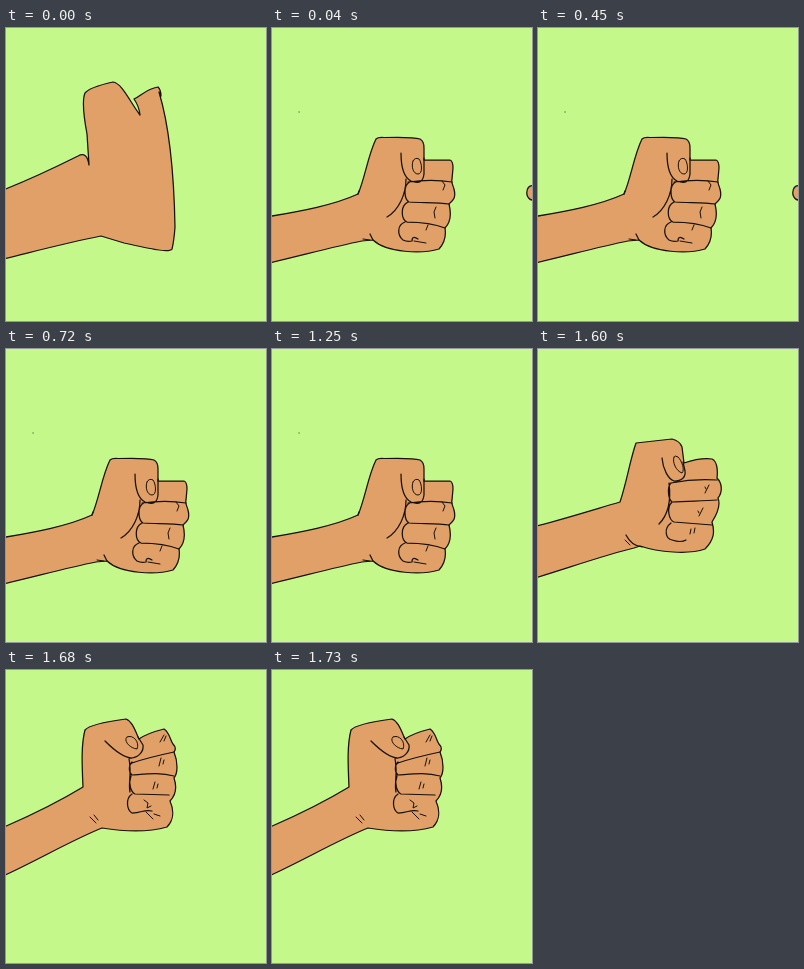
An HTML page that plays this animation: 260 by 293 pixels, repeating every 1.76 s.

```html
<!DOCTYPE html>
<html lang="en">
<head>
<meta charset="utf-8">
<title>Fist shake</title>
<style>
  html, body { margin: 0; width: 100%; height: 100%; overflow: hidden; background: #c5f88b; }
  svg { display: block; width: 100%; height: 100%; }
  path { fill: none; stroke: #17100a; stroke-width: 1.25; stroke-linecap: round; stroke-linejoin: round; }
  .skin { fill: #e0a067; }
  .fine { stroke-width: 1; }
  g { visibility: hidden; }
</style>
</head>
<body>
<svg viewBox="0 0 260 293">
  <g id="swing">
    <path class="skin" d="M-3 162C25 151 50 139 72 128Q81 123 83 137L81 106C78 90 76 72 79 65C83 60 98 56 107 54C116 55 124 74 134 87Q133 78 128 71C135 68 140 61 152 59Q155 62 155 68L153 64C163 97 168 145 169 199Q168 213 166 221C163 225 145 221 118 215L95 208C60 215 30 223 -3 231"/>
  </g>

  <g id="rest">
    <path class="skin" d="M-3 188.500C30 183 62 177 86 166C93 150 96 127 104 111Q106 109 112 109.500C130 109 142 109 148 111Q152 113 152 120V132L178 132Q181 133 181 140L180 151C179 155 181 157 182 161C184 169 182 172 177 176C179 184 179 194 173 200Q175 212 167 221C150 226 115 225 101 212L90 213C60 219 28 228 -3 235"/>
    <path d="M129 125C129 140 133 150 139 153C147 156 151 154 152 146V130M136 154C150 152 168 152 180 154M138 154C131 157 132 171 137 174C150 175 166 174 177 176M136 174C128 178 129 191 135 194C150 194 163 196 173 200M133 194C125 197 125 207 131 212Q135 214 140 213Q140 207 146 211M134 151C134 166 127 182 115 189M86 166l1 -3M101 212l-3 -6"/>
    <path class="fine" d="M141 133C139 138 141 146 146 146C151 146 150 135 147 131Q143 129 141 133M170 153l3 4 -2 5M164 179l-2 5 1 6M156 197l-2 5M142 213l12 2M91 211l7 1M27 84h.1"/>
  </g>

  <g id="fingertip">
    <path class="skin" d="M263 158C257 156 254 161 255 167Q257 173 263 172"/>
  </g>

  <g id="lift">
    <path class="skin" d="M-3 177.500C30 169 58 160 82 153C89 132 92 111 98 94L134 90Q142 92 144 98L146 114C155 111 165 109 174 110C179 112 180 121 179 129C184 134 185 143 180 149C183 156 179 165 174 173C177 183 176 191 167 200C150 206 120 203 102 197L96 199C70 205 30 219 -3 229"/>
    <path d="M124 109C125 120 130 130 136 132C144 132 148 128 147 122L145 113M133 134C148 131 165 130 179 131M133 134C129 138 130 150 134 153C149 152 165 152 179 151M134 153C128 159 131 171 136 173C150 174 162 175 174 176M133 174C125 180 128 190 134 191Q143 194 148 191M131 134C133 150 131 165 121 175M88 186C91 192 96 197 104 198"/>
    <path class="fine" d="M136 108C134 113 138 122 144 124C147 121 144 112 140 108Q137 106 136 108M167 144l4 -8M167 138l1 2M161 167l4 -8M160 162l1 2M152 185l1 -5M156 184l1 -5M87 191l5 5"/>
  </g>

  <g id="raise">
    <path class="skin" d="M-3 157.500C28 144 54 131 77 117C76 95 75 75 79 60C84 54 105 51 120 49C126 51 129 60 133 69C140 64 150 61 158 59C164 63 164 70 167 74Q171 78 168 82C172 92 172 103 168 108C171 117 170 125 164 131C168 140 168 150 161 157C140 163 115 161 96 158C68 169 30 191 -3 206"/>
    <path d="M99 71C107 79 117 88 126 88C133 87 138 81 137 75L132 67M126 93C140 88 154 85 168 82M126 92C122 96 123 103 126 105C140 104 154 102 168 106M125 106C122 114 125 122 129 124L163 125M126 124C119 129 121 140 126 143C136 143 138 139 146 141M123 89C126 104 122 114 124 122"/>
    <path class="fine" d="M121 67C117 70 123 78 131 79C134 72 127 64 121 67M154 72l4 -7M158 71l2 -5M153 96l2 -8M157 94l1 -4M147 119l2 -7M151 118l1 -4M138 130l4 3 -1 5 4 -2M140 142l7 7M148 144l6 2M84 147l6 6M88 145l4 5"/>
  </g>
</svg>
<script>
  const LOOP = 1760;
  // Visible interval of each drawing, in ms
  const shown = {
    swing: [0, 40],
    rest: [40, 1600],
    fingertip: [40, 720],
    lift: [1600, 1680],
    raise: [1680, LOOP]
  };
  const start = performance.now();

  function draw() {
    const time = (performance.now() - start) % LOOP;
    for (const [id, [from, to]] of Object.entries(shown)) {
      document.getElementById(id).style.visibility = time >= from && time < to ? "visible" : "hidden";
    }
    requestAnimationFrame(draw);
  }
  draw();
</script>
</body>
</html>
```
